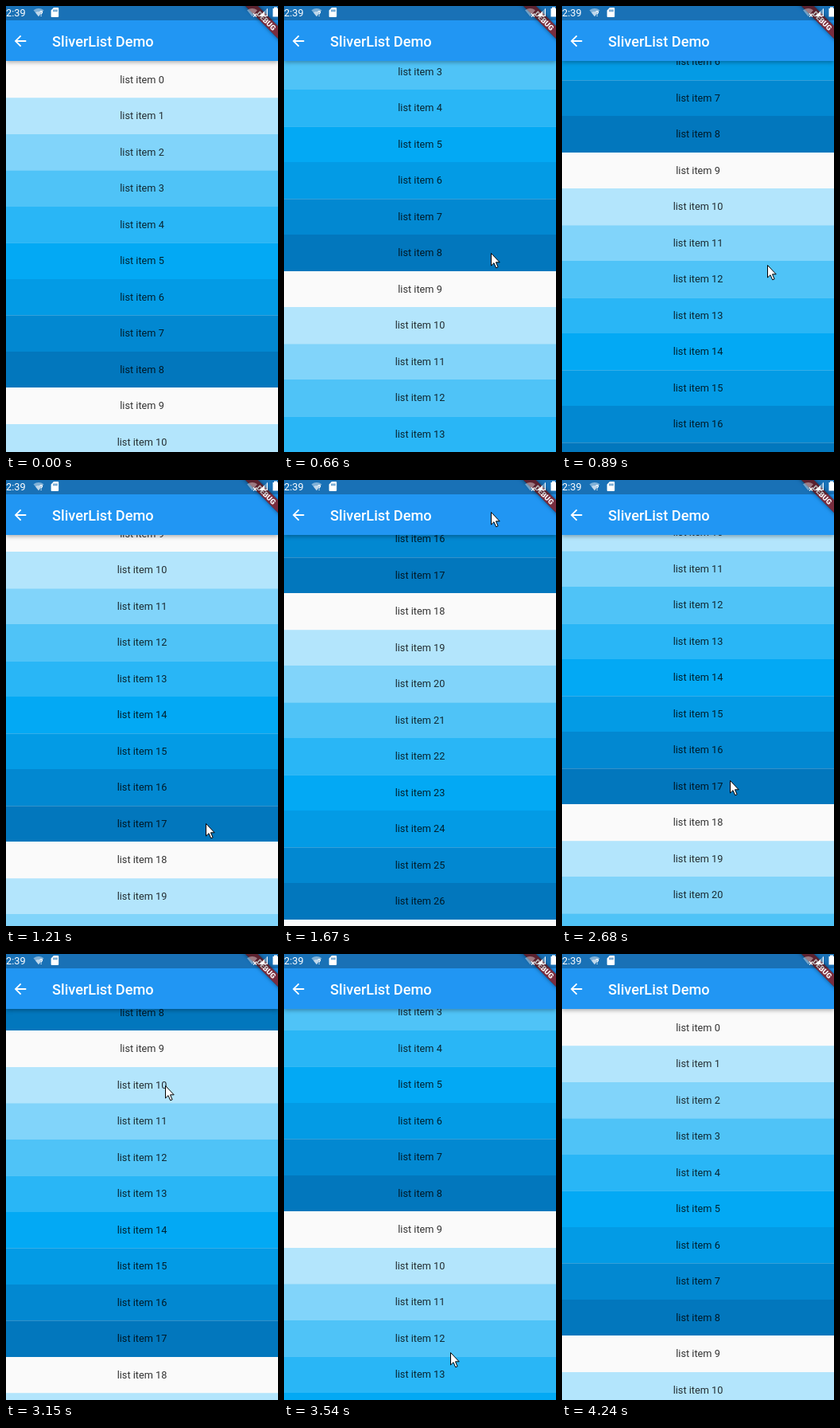
Animation of 342 by 560 pixels, one loop 4.62 s. Source, as an HTML page:

```html
<!DOCTYPE html>
<html lang="en">
<head>
<meta charset="utf-8">
<title>SliverList Demo</title>
<style>
  html, body { margin: 0; width: 100%; height: 100%; overflow: hidden; }
  body { position: relative; background: #fafafa; font-family: Roboto, "Noto Sans", sans-serif; }
  #stage { position: absolute; left: 0; top: 0; width: 342px; height: 560px; overflow: hidden; background: #fafafa; }
  #list { position: absolute; left: 0; width: 100%; margin: 0; padding: 0; list-style: none; }
  #list li {
    position: relative; height: 45.5px; line-height: 45.5px;
    text-align: center; font-size: 12.74px; color: rgba(0, 0, 0, .8);
  }
  /* hairline seam between every second pair of rows */
  #list li:nth-child(even)::before {
    content: ""; position: absolute; left: 0; top: 0; width: 100%; height: 1px;
    background: rgba(250, 250, 250, .2);
  }
  #glow {
    position: absolute; left: -60px; top: 32px; width: 462px; height: 76px;
    border-radius: 50%; background: #2196f3; opacity: 0;
  }
  #bar {
    position: absolute; left: 0; top: 0; width: 100%; height: 69px; background: #2196f3;
    box-shadow: 0 2px 5px rgba(0, 0, 0, .3);
  }
  #status { position: absolute; left: 0; top: 0; width: 100%; height: 18px; background: rgba(0, 0, 0, .25); }
  #clock { position: absolute; left: 0; top: 0; font-size: 12.74px; line-height: 17px; color: #fff; }
  #title { position: absolute; left: 58px; top: 32px; font-size: 18.2px; font-weight: 500; line-height: 25px; color: #fff; white-space: nowrap; }
  svg { position: absolute; left: 0; top: 0; overflow: visible; }
  #banner {
    position: absolute; left: 291.2px; top: 13.2px; width: 72.8px; height: 10.9px;
    transform: rotate(45deg);
    background: linear-gradient(rgba(183, 28, 28, .63) 0 100%), rgba(0, 0, 0, .5);
    box-shadow: 0 0 5px rgba(0, 0, 0, .5);
    color: #fff; font-size: 9.3px; font-weight: 900; line-height: 11px; text-align: center;
  }
</style>
</head>
<body>
<div id="stage">
  <ul id="list"></ul>
  <div id="glow"></div>
  <div id="bar">
    <div id="title">SliverList Demo</div>
    <div id="banner">DEBUG</div>
    <div id="status"></div>
    <div id="clock">2:39</div>
    <svg width="342" height="69" fill="#fff">
      <path transform="translate(7.1 33.1) scale(.91)" d="M20 11H7.83l5.59-5.59L12 4l-8 8 8 8 1.41-1.41L7.83 13H20v-2z"/>
      <path d="M34.5 5.2Q41 .6 47.5 5.2L41 13.2z" opacity=".45"/>
      <path d="M37 8.2Q41 5.6 44 8.4L41 13.2z" opacity=".5"/>
      <text x="42" y="13" font-size="9" font-weight="700">?</text>
      <path fill-rule="evenodd" d="M60 2h5.2q1 0 1 1v10q0 1-1 1H57.6q-1 0-1-1V5.4zM59.4 4.6v2.6h1.1V4.6zM61.4 4.6v2.6h1.1V4.6zM63.4 4.6v2.6h1.1V4.6z"/>
      <path d="M303 5.2Q309.5 .6 316 5.2L309.5 13.2z" opacity=".4"/>
      <path d="M311 9.5l4 4m0-4l-4 4" stroke="#fff" stroke-width="1.2"/>
      <path d="M329 2.5V13H318.5z" opacity=".35"/>
      <path d="M325 6.5V13h-6.5zM328 3.5h1V13h-10v-1h9z"/>
      <path d="M337 1.5h4V3h1.5v10.5h-7V3H337z"/>
    </svg>
  </div>
  <svg id="pointer" width="1" height="1">
    <circle id="press" r="15" fill="#ff0" opacity=".5"/>
    <path d="M.5.5V16L4 12.7 6.7 18.8 9.1 17.8 6.5 11.8H11.2z" fill="#fff" stroke="#000"/>
  </svg>
</div>
<script>
const LOOP = 4620, TOP = 69.5;
const SHADES = ["#fafafa", "#b3e5fc", "#81d4fa", "#4fc3f7", "#29b6f6", "#03a9f4", "#039be5", "#0288d1", "#0277bd"];

const TICK = 77;
const ACTIVE = [[70, 280], [430, 1670], [1990, 2140], [2290, 4240]];

// key poses, eased in between: time, values
const SCROLL = [[270, 0], [1290, 443], [1670, 746.5], [2140, 746.5], [2960, 383], [3150, 383], [3840, 0]];
const POINTER = [
  [70, 281, 519], [280, 257, 484], [750, 260, 293], [1210, 251, 431], [1670, 260, 40], [1990, 260, 40],
  [2140, 229, 161], [2620, 211, 385], [3150, 200, 165], [3620, 210, 529]
];
const GLOW = [[3620, 0], [3800, .1], [4200, 0]];
const PRESSES = [420, 1280, 2280, 3220], PRESS_TIME = 230;
const POINTER_SHOWN = [70, 4160];

const $ = id => document.getElementById(id);
const list = $("list"), pointer = $("pointer"), press = $("press"), glow = $("glow");

for (let i = 0; i < 36; i++) {
  const row = document.createElement("li");
  row.textContent = "list item " + i;
  row.style.background = SHADES[i % SHADES.length];
  list.append(row);
}

const within = (t, start, end) => t >= start && t < end;
const smooth = u => u * u * (3 - 2 * u);

function snap(t) {
  const now = t + 4;
  const span = ACTIVE.filter(([start]) => start <= now).pop();
  if (!span) return 0;
  const [start, end] = span;
  const step = (end - start) / Math.round((end - start) / TICK);
  return Math.min(end, start + step * Math.floor((now - start) / step));
}

function at(track, t, col = 1) {
  const i = track.findIndex(key => key[0] > t);
  if (i === 0) return track[0][col];
  if (i < 0) return track[track.length - 1][col];
  const a = track[i - 1], b = track[i];
  return a[col] + (b[col] - a[col]) * smooth((t - a[0]) / (b[0] - a[0]));
}

function draw(time) {
  const t = snap(time % LOOP);
  list.style.top = TOP - at(SCROLL, t) + "px";
  glow.style.opacity = at(GLOW, t);
  pointer.style.display = within(t, ...POINTER_SHOWN) ? "" : "none";
  pointer.style.left = Math.round(at(POINTER, t)) + "px";
  pointer.style.top = Math.round(at(POINTER, t, 2)) + "px";
  press.style.display = PRESSES.some(p => within(t, p, p + PRESS_TIME)) ? "" : "none";
}

const origin = performance.now();
function tick() {
  draw(performance.now() - origin);
  requestAnimationFrame(tick);
}
tick();
</script>
</body>
</html>
```
